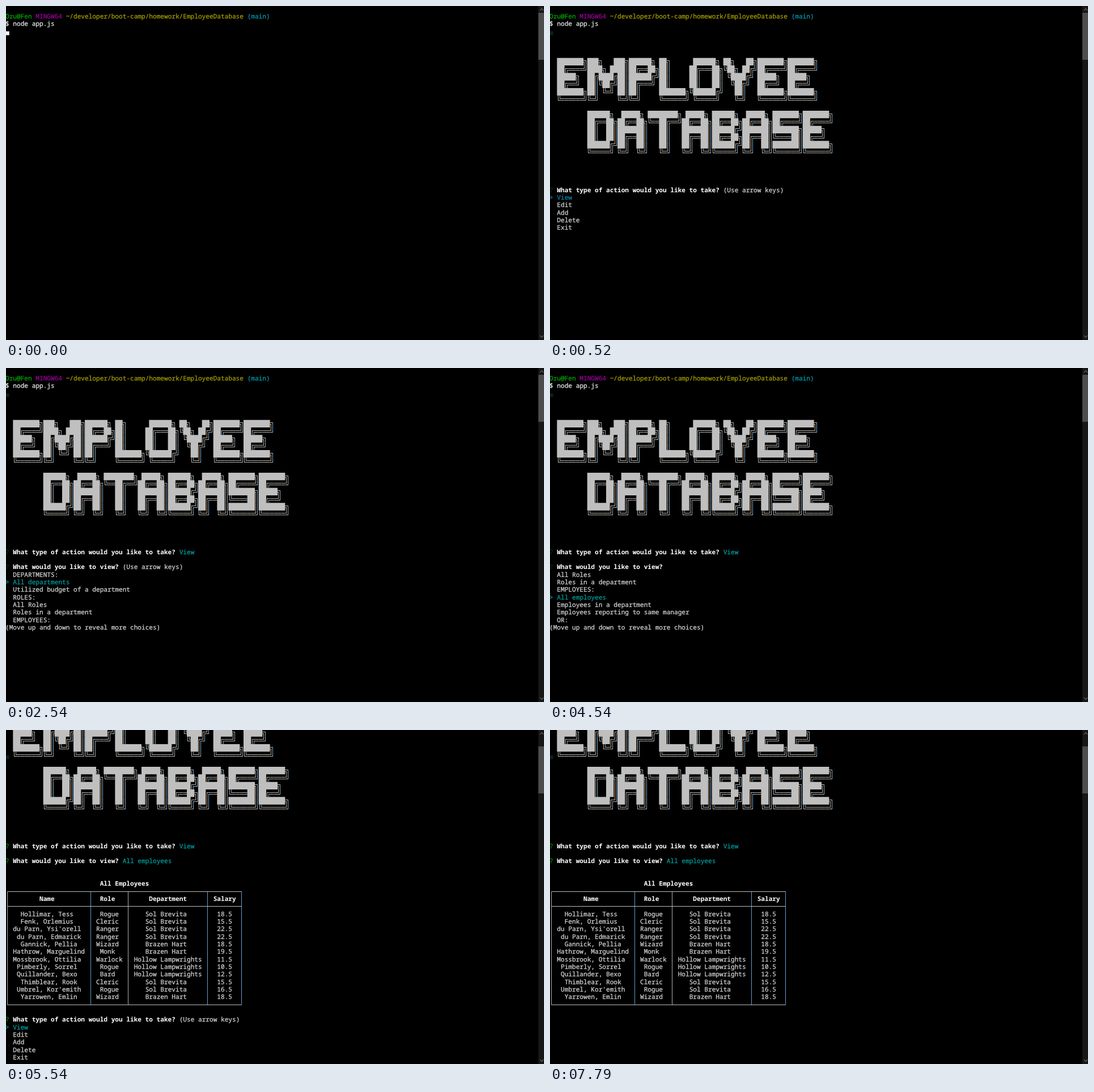
An HTML page for the animation above (8000 ms loop, 949x590 px).

```html
<!DOCTYPE html>
<html lang="en">
<head>
<meta charset="utf-8">
<title>Employee database terminal</title>
<style>
  html, body { margin: 0; width: 100%; height: 100%; overflow: hidden; background: #000; }
  svg { display: block; width: 100%; height: 100%; }
  text { font: 11.111px "Noto Sans Mono", "DejaVu Sans Mono", monospace; text-rendering: geometricPrecision; stroke-width: 0.3; }
  .bold { font-weight: bold; stroke-width: 0; }
</style>
</head>
<body>
<svg id="screen" viewBox="0 0 949 590"></svg>
<script>
const CELL_W = 20 / 3, CELL_H = 40 / 3, LEFT = -1, TOP = 11.7;
const LOOP = 8000;
const STARTS = [0, 520, 2540, 3790, 4040, 4290, 4540, 5540, 7790];

const GREY = '#d0d0d0', WHITE = '#fff', TEAL = '#009a9a', BLUE = '#0a80aa';
const DIM_GREEN = '#04300c', GREEN = '#008a00';

const GLYPHS = {
  E: '███████╗|██╔════╝|█████╗  |██╔══╝  |███████╗|╚══════╝',
  M: '███╗   ███╗|████╗ ████║|██╔████╔██║|██║╚██╔╝██║|██║ ╚═╝ ██║|╚═╝     ╚═╝',
  P: '██████╗ |██╔══██╗|██████╔╝|██╔═══╝ |██║     |╚═╝     ',
  L: '██╗     |██║     |██║     |██║     |███████╗|╚══════╝',
  O: ' ██████╗ |██╔═══██╗|██║   ██║|██║   ██║|╚██████╔╝| ╚═════╝ ',
  Y: '██╗   ██╗|╚██╗ ██╔╝| ╚████╔╝ |  ╚██╔╝  |   ██║   |   ╚═╝   ',
  D: '██████╗ |██╔══██╗|██║  ██║|██║  ██║|██████╔╝|╚═════╝ ',
  A: ' █████╗ |██╔══██╗|███████║|██╔══██║|██║  ██║|╚═╝  ╚═╝',
  T: '████████╗|╚══██╔══╝|   ██║   |   ██║   |   ██║   |   ╚═╝   ',
  B: '██████╗ |██╔══██╗|██████╔╝|██╔══██╗|██████╔╝|╚═════╝ ',
  S: '███████╗|██╔════╝|███████╗|╚════██║|███████║|╚══════╝'
};
// Directions in which each double-line corner opens.
const CORNERS = { '╔': [1, 1], '╗': [-1, 1], '╚': [1, -1], '╝': [-1, -1] };

const ACTIONS = ['View', 'Edit', 'Add', 'Delete', 'Exit'];
const VIEWS = ['DEPARTMENTS:', 'All departments', 'Utilized budget of a department',
  'ROLES:', 'All Roles', 'Roles in a department',
  'EMPLOYEES:', 'All employees', 'Employees in a department',
  'Employees reporting to same manager', 'OR:'];
const TEAMS = ['Sol Brevita', 'Brazen Hart', 'Hollow Lampwrights'];
const STAFF = [
  ['Hollimar, Tess', 'Rogue', 0, 18.5],
  ['Fenk, Orlemius', 'Cleric', 0, 15.5],
  ["du Parn, Ysi'orell", 'Ranger', 0, 22.5],
  ['du Parn, Edmarick', 'Ranger', 0, 22.5],
  ['Gannick, Pellia', 'Wizard', 1, 18.5],
  ['Hathrow, Marguelind', 'Monk', 1, 19.5],
  ['Mossbrook, Ottilia', 'Warlock', 2, 11.5],
  ['Pimberly, Sorrel', 'Rogue', 2, 10.5],
  ['Quillander, Bexo', 'Bard', 2, 12.5],
  ['Thimblear, Rook', 'Cleric', 0, 15.5],
  ["Umbrel, Kor'emith", 'Rogue', 0, 16.5],
  ['Yarrowen, Emlin', 'Wizard', 1, 18.5]
];

const colX = col => LEFT + col * CELL_W;
const rowY = row => TOP + row * CELL_H;
const snap = v => Math.floor(v) + 0.5;
const rect = (x, y, w, h, fill) => `<rect x="${x}" y="${y}" width="${w}" height="${h}" fill="${fill}"/>`;
const stroke = (d, color) => `<path d="${d}" fill="none" stroke="${color}"/>`;
const text = (col, row, str, color = GREY, cls = '') =>
  `<text x="${colX(col)}" y="${rowY(row) + 10.3}" fill="${color}" stroke="${color}" class="${cls}">${str}</text>`;

function word(letters, firstCol, firstRow) {
  let blocks = '', flat = '', warm = '', cool = '';
  const gap = 1.5;
  for (let r = 0; r < 6; r++) {
    const line = [...letters].map(l => GLYPHS[l].split('|')[r]).join('');
    [...line].forEach((ch, i) => {
      const x = colX(firstCol + i), y = rowY(firstRow + r);
      const cx = x + CELL_W / 2, cy = y + CELL_H / 2;
      if (ch === '█') blocks += `M${x} ${y}h${CELL_W}v${CELL_H}h${-CELL_W}z`;
      for (const side of [-1, 1]) {
        const lineX = snap(cx + side * gap);
        let upright = '';
        if (ch === '═') flat += `M${x} ${snap(cy + side * gap)}h${CELL_W}`;
        if (ch === '║') upright = `M${lineX} ${y}v${CELL_H}`;
        if (CORNERS[ch]) {
          const [dx, dy] = CORNERS[ch];
          const lineY = snap(cy + side * dx * dy * gap);
          flat += `M${cx + dx * CELL_W / 2} ${lineY}H${lineX - dx / 2}`;
          upright = `M${lineX} ${lineY}V${cy + dy * CELL_H / 2}`;
        }
        if (side < 0) warm += upright; else cool += upright;
      }
    });
  }
  return `<path d="${blocks}" fill="#bfbfbf"/>` +
    stroke(flat, '#bcb8b0') + stroke(warm, '#c8a880') + stroke(cool, '#78acd2');
}

const banner = row => word('EMPLOYEE', 2, row) + word('DATABASE', 10, row + 7);

function prompt(row, question, answer, answerColor, markColor) {
  return text(0, row, '?', markColor) + text(2, row, question, WHITE, 'bold') +
    text(question.length + 3, row, answer, answerColor);
}
const askAction = (row, answer, color, mark) =>
  prompt(row, 'What type of action would you like to take?', answer, color, mark);
const askView = (row, answer, color, mark) =>
  prompt(row, 'What would you like to view?', answer, color, mark);

const menu = (row, items, selected, color) => items.map((item, i) =>
  (i === selected ? text(0, row + i, '&gt;', color) : '') +
  text(2, row + i, item, i === selected ? color : GREY)).join('');

function scrollbar(thumbY) {
  return rect(939, 0, 10, 590, '#171717') + rect(939, thumbY, 10, 83, '#4d4d4d') +
    stroke('M942 8l3 -3.5l3 3.5M942 582l3 3.5l3 -3.5', '#8c8c8c');
}

const cursor = color => rect(0, 44.7, 5.8, 6.8, color);

const shell = () => scrollbar(12) +
  text(0, 0, 'Oru@Fen', '#00a000') + text(8, 0, 'MINGW64', '#960096') +
  text(16, 0, '~/developer/boot-camp/homework/EmployeeDatabase', '#a09a00') +
  text(64, 0, '(main)', '#0098a8') + text(0, 1, '$ node app.js', '#e4e4e4');

const home = () => shell() + cursor('#0a1e1e') + banner(6);

function viewMenu(selected, hint = '') {
  const first = Math.max(0, selected - 3);
  return home() + askAction(23, 'View', TEAL, DIM_GREEN) + askView(25, hint, GREY, DIM_GREEN) +
    menu(26, VIEWS.slice(first, first + 7), selected - first, TEAL) +
    text(0, 33, '(Move up and down to reveal more choices)');
}

// Column sums used to centre each table field.
function tableRow(row, fields, color, cls) {
  return [23, 55, 86, 116].map((sum, i) =>
    text(Math.floor((sum - String(fields[i]).length) / 2), row, fields[i], color, cls)).join('');
}

function table() {
  const midX = col => snap(colX(col + 0.5)), midY = row => snap(rowY(row + 0.5));
  const rules = [20, 22, 35].map(r => `M${midX(0)} ${midY(r)}H${midX(62)}`).join('');
  const uprights = cols => cols.map(c => `M${midX(c)} ${midY(20)}V${midY(35)}`).join('');
  return text(25, 19, 'All Employees', WHITE, 'bold') +
    stroke(uprights([22, 53, 62]), '#649cce') + stroke(uprights([0, 32]), '#b0b0b4') +
    stroke(rules, '#bcbcbc') +
    tableRow(21, ['Name', 'Role', 'Department', 'Salary'], WHITE, 'bold') +
    STAFF.map(([name, role, team, pay], i) => tableRow(23 + i, [name, role, TEAMS[team], pay])).join('');
}

const results = () => scrollbar(29) + cursor('#0a1e1e') + banner(-3) +
  askAction(14, 'View', TEAL, GREEN) + askView(16, 'All employees', TEAL, GREEN) + table();

const HINT = '(Use arrow keys)';
const SCENES = [
  () => shell() + cursor('#f4f4f4'),
  () => home() + askAction(23, HINT, GREY, DIM_GREEN) + menu(24, ACTIONS, 0, BLUE),
  () => viewMenu(1, HINT),
  () => viewMenu(2),
  () => viewMenu(4),
  () => viewMenu(5),
  () => viewMenu(7),
  () => results() + askAction(37, HINT, GREY, GREEN) + menu(38, ACTIONS, 0, TEAL),
  results
];

const screenEl = document.getElementById('screen');
const origin = performance.now();
let shown = -1;

function draw() {
  const t = Math.max(0, performance.now() - origin) % LOOP;
  const scene = STARTS.filter(start => start <= t).length - 1;
  if (scene !== shown) {
    screenEl.innerHTML = SCENES[scene]();
    shown = scene;
  }
  requestAnimationFrame(draw);
}
draw();
</script>
</body>
</html>
```
